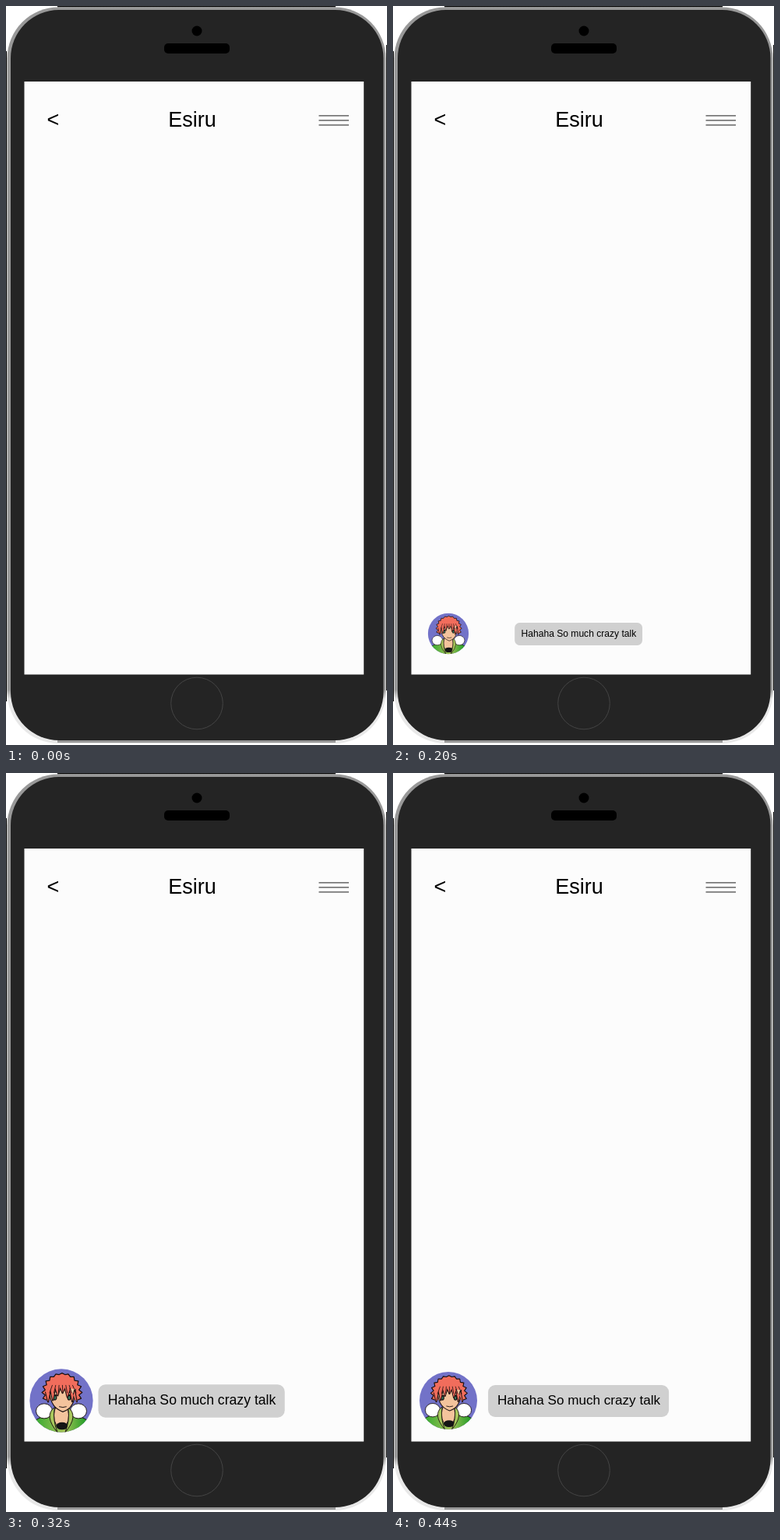
These frames come from a looping animation (489x949 px, 1040 ms). An HTML page with a canvas:

```html
<!DOCTYPE html>
<html lang="en">
<head>
<meta charset="utf-8">
<title>Chat message</title>
<style>
  html, body { margin: 0; width: 100%; height: 100%; overflow: hidden; background: #fff; }
  canvas { display: block; }
</style>
</head>
<body>
<canvas id="stage" width="489" height="949"></canvas>
<script>
const ctx = document.getElementById('stage').getContext('2d');
const LOOP = 1040, STEP = 40;
const FONT = '"Liberation Sans", Arial, sans-serif';
const { PI, sin, cos, abs } = Math;

function paint(fill, line, width = 1) {
  if (fill) { ctx.fillStyle = fill; ctx.fill(); }
  if (line) { ctx.strokeStyle = line; ctx.lineWidth = width; ctx.stroke(); }
}

function rect(x, y, w, h, color) {
  ctx.fillStyle = color;
  ctx.fillRect(x, y, w, h);
}

function round(x, y, w, h, r, color) {
  ctx.beginPath();
  ctx.roundRect(x, y, w, h, r);
  paint(color);
}

function oval(x, y, rx, ry, fill, line, width) {
  ctx.beginPath();
  ctx.ellipse(x, y, rx, ry, 0, 0, PI * 2);
  paint(fill, line, width);
}

// Path through n + 1 points; place(u, odd) gives each one
function trace(n, place) {
  ctx.beginPath();
  for (let i = 0; i <= n; i++) ctx.lineTo(...place(i / n, i % 2));
}

function text(str, x, y, size, align) {
  ctx.font = `${size}px ${FONT}`;
  ctx.textAlign = align;
  ctx.fillStyle = '#000';
  ctx.fillText(str, x, y);
}

function fade(x0, y0, x1, y1, ...stops) {
  const g = ctx.createLinearGradient(x0, y0, x1, y1);
  stops.forEach((color, i) => g.addColorStop(i / (stops.length - 1), color));
  return g;
}

function phone() {
  rect(0, 0, 489, 949, '#fff');
  rect(66, 0, 357, 1.5, '#000');
  rect(0, 58, 1, 835, '#000');
  rect(488, 50, 1, 829, '#111');
  round(1.5, 1.5, 486, 945.5, 66, fade(0, 878, 0, 890, '#989898', '#e8e8e8'));
  rect(66, 943, 357, 3, '#989898');
  round(6, 5, 478.5, 938, 62, '#242424');
  oval(245, 32, 6.5, 6.5, '#000');
  round(203, 48, 84, 13, 5, '#000');
  oval(245, 895.5, 33.3, 33.3, null, '#444');
  rect(23.5, 97, 435.7, 761.5, '#fcfcfc');

  text('<', 52.5, 155, 27, 'left');
  text('Esiru', 239, 155, 27, 'center');
  for (let i = 0; i < 3; i++) rect(401.5, 140 + 6 * i, 38.5, 1.7, '#777');
}

const INK = '#1a1010', SKIN = '#f3c39c', HAIR = '#f16d5c';

function clothes() {
  oval(0, 44, 46, 27, fade(-30, 0, 36, 0, '#44ad35', '#a5c458', '#169a22'), INK);
  for (const s of [-1, 1]) oval(s * 23, 14, 11, 10, '#fff', INK);
  oval(0, 20, 10, 17, SKIN, INK);
  oval(1, 34, 8, 5, '#151515');
  for (const s of [-1, 1]) {
    ctx.beginPath();
    ctx.moveTo(s * 9, 9);
    ctx.quadraticCurveTo(s * 24, 20, s * 5, 43);
    ctx.quadraticCurveTo(s * 12, 26, s * 9, 9);
    paint('#a8c75c', INK);
  }
}

function face() {
  ctx.beginPath();
  ctx.moveTo(-16, -16);
  ctx.bezierCurveTo(-16, 6, -6, 12, 2, 15);
  ctx.bezierCurveTo(12, 12, 19, 4, 19, -16);
  paint(SKIN, INK, 1.2);
  for (const s of [-1, 1]) {
    oval(1 + s * 9.5, -4, 2, 3, '#367a60', INK, 1.3);
    trace(1, u => [1 + s * (6 + 8 * u), -7 - u]);
    paint(null, INK, 1.6);
  }
  trace(2, u => [-3 + 10 * u, 8 + sin(PI * u)]);
  paint(null, INK);
}

function crown() {
  trace(26, (u, odd) => {
    const a = PI * (0.85 + 1.3 * u);
    const r = odd ? 1 : 0.95 - 0.1 * abs(cos(a));
    return [1 + 27 * r * cos(a), -11 + 26 * r * sin(a)];
  });
  paint(HAIR, INK, 1.3);
}

function fringe() {
  trace(13, (u, odd) => [
    -21 + 42 * u,
    odd ? -8 + 9 * abs(2 * u - 1) + 3 * sin(9 * u) : -12 - 6 * sin(PI * u)
  ]);
  paint(null, INK, 2.2);
  ctx.quadraticCurveTo(1, -45, -21, -12);
  paint(HAIR);
  for (let x = -16; x <= 20; x += 6) {
    trace(1, u => [x * (1 - 0.25 * u), -10 - 11 * u]);
    paint(null, INK, 0.9);
  }
}

// Fills a circle of radius 42.5 around the origin
function portrait() {
  ctx.lineJoin = 'round';
  ctx.beginPath();
  ctx.arc(0, 0, 42.5, 0, PI * 2);
  ctx.clip();
  rect(-43, -43, 86, 86, '#7272c8');
  clothes();
  crown();
  face();
  fringe();
}

function bubble() {
  round(-116, -20.5, 232, 41, 9, '#d0d0d0');
  text('Hahaha So much crazy talk', 0.4, 4.5, 17.1, 'center');
}

function at(x, y, scale, draw) {
  ctx.save();
  ctx.translate(x, y);
  ctx.scale(scale, scale);
  draw();
  ctx.restore();
}

// Linear growth, then an overshoot that settles
function pop(t, peak) {
  if (t < 280) return 0.1766 * (t / STEP - 1);
  const left = Math.max(0, 1 - (t - 280) / 160);
  return 1 + (peak - 1) * left ** 1.45;
}

function render(now) {
  const t = Math.floor((now % LOOP) / STEP) * STEP;
  phone();
  if (t >= 80) {
    at(71, 806, pop(t, 1.149) * 37 / 42.5, portrait);
    at(238.1, 806.5, pop(t, 1.048), bubble);
  }
}

const start = performance.now();
function tick() {
  render(performance.now() - start);
  requestAnimationFrame(tick);
}
tick();
</script>
</body>
</html>
```
